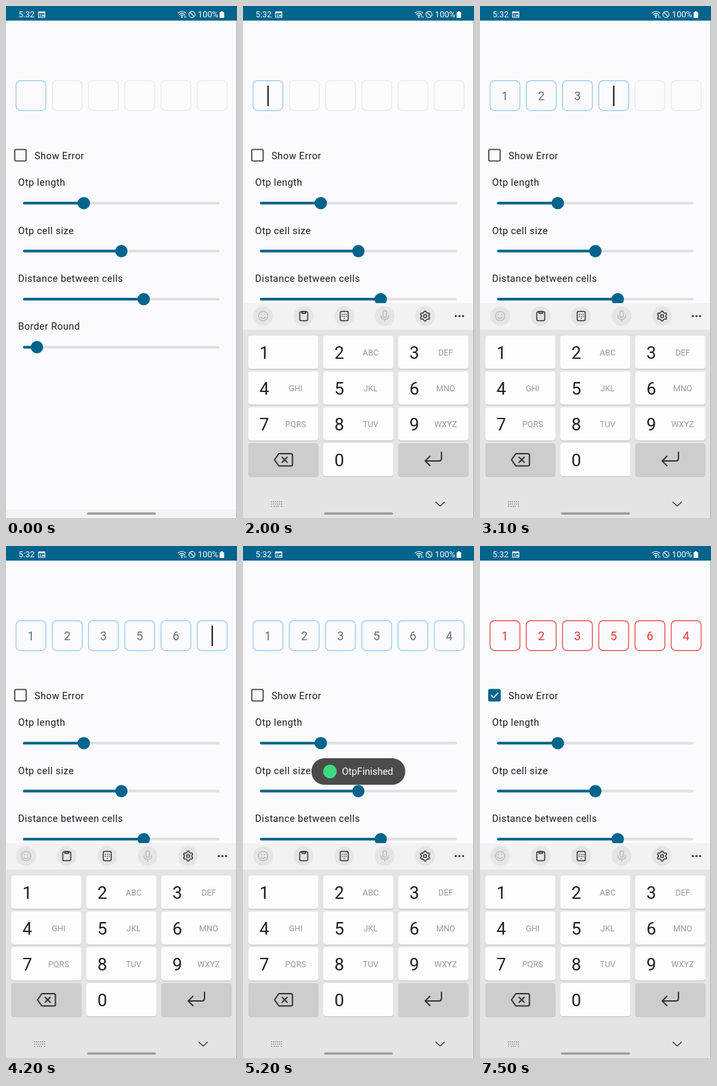
Write an HTML page that moves like this. It is 348x772 px and loops after 8 s.

```html
<!DOCTYPE html>
<html lang="en">
<head>
<meta charset="utf-8">
<style>
  html, body { margin: 0; width: 100%; height: 100%; overflow: hidden; background: #fbfbff; }
  svg { display: block; width: 100%; height: 100%; font-family: Roboto, sans-serif; }
  .label { font-size: 14.5px; letter-spacing: .45px; fill: #1b1c1f; }
  .num { font-size: 26px; fill: #1e1e1e; }
  .abc { font-size: 12.5px; fill: #999; text-anchor: middle; }
  .digit { font-size: 18px; text-anchor: middle; }
  .icon { fill: none; stroke: #333; stroke-width: 1.5; stroke-linecap: round; stroke-linejoin: round; }
  .dim { stroke: #bcbcbc; }
</style>
</head>
<body>
<svg viewBox="0 0 348 772">
  <rect width="348" height="772" fill="#fbfbff"/>
  <rect width="348" height="22" fill="#00648c"/>
  <g fill="#fff">
    <text x="19" y="17.4" font-size="12.5">5:32</text>
    <text x="289" y="17.4" font-size="12.8">100%</text>
    <path d="M323.8 8h2.8v1.2h1.1q.9 0 .9.9v7q0 .9-.9.9h-5q-.9 0-.9-.9v-7q0-.9.9-.9h1.1z"/>
    <path d="M49 8.5h9.6v2.4H49z"/>
    <circle cx="265" cy="16.6" r="1.2"/>
  </g>
  <g fill="none" stroke="#fff" stroke-width="1.1">
    <path d="M49 9h9.6v8H49zM51 13h2.2M51 15h2.2M55 13.5h2v1.5h-2z"/>
    <path d="M258.8 10.8q6.2-5 12.4 0M260.8 12.8q4.2-3.4 8.4 0M262.8 14.8q2.2-1.8 4.4 0"/>
    <path d="M269 13v5M271.2 15v3" stroke-width=".8"/>
    <circle cx="280.2" cy="12.7" r="4.6"/><path d="M277 9.5l6.4 6.4"/>
  </g>

  <g id="cells"></g>
  <rect id="cursor" y="120" width="2" height="31" fill="#111"/>

  <circle id="ripple" cx="22" cy="225" fill="#00648c"/>
  <rect id="box" x="13.2" y="216.4" width="17.2" height="17.2" rx="1.8" stroke-width="1.8"/>
  <path id="tick" d="M16.8 225l3.6 3.6 7-7.2" fill="none" stroke="#fff" stroke-width="1.8"/>
  <text class="label" x="43" y="230.7">Show Error</text>
  <g id="sliders"></g>

  <g id="toast">
    <rect x="103" y="320" width="141.5" height="40" rx="20" fill="#4b4b4b"/>
    <circle cx="131" cy="340" r="10.3" fill="#3ddc84"/>
    <text x="149" y="345.4" font-size="14.5" fill="#fff">OtpFinished</text>
  </g>

  <rect y="759" width="348" height="13" fill="#f3f3f4"/>
  <g id="keyboard">
    <rect y="448" width="348" height="324" fill="#e4e4e4"/>
    <rect y="448" width="348" height="40" fill="#f2f2f3"/>
    <g id="tools" fill="#e5e5e6"></g>
    <g class="icon dim">
      <circle cx="30.3" cy="467.5" r="7"/><path d="M26.8 469.3q3.5 4 7 0M27.8 465v.6M32.8 465v.6"/>
      <rect x="210.8" y="459.5" width="5.4" height="10" rx="2.7"/><path d="M207.8 467q0 5.5 5.7 5.5t5.7-5.5M213.5 472.5v3"/>
    </g>
    <g class="icon">
      <rect x="85.5" y="461" width="12" height="13.5" rx="2"/><path d="M88.7 460.5h5.6v3h-5.6z"/>
      <rect x="146.5" y="460.5" width="12" height="14" rx="2"/>
      <path d="M149.6 465h.1m2.8 0h.1m2.8 0h.1M149.6 468h.1m2.8 0h.1m2.8 0h.1M152.5 471h.1"/>
      <path id="gear"/><circle cx="274.3" cy="467.5" r="2.3"/>
      <path d="M320.5 467.5h.1m5.4 0h.1m5.4 0h.1" stroke-width="3.2"/>
    </g>
    <g id="keys"></g>
    <g class="icon" stroke-width="2">
      <path d="M54 675h18q2.5 0 2.5 2.5v13.5q0 2.5-2.5 2.5H54l-6.5-9.2zM59 680.5l7.5 7.5m0-7.5l-7.5 7.5" stroke-width="2"/>
      <path d="M299 673v9q0 4-4 4h-20.500m7-7l-7 7 7 7" stroke-width="2"/>
      <path d="M290.500 748l6.500 6 6.500-6" stroke-width="1.300"/>
      <path d="M43 747.500h16M43 751h16M43 754.500h1m3 0h8m3 0h1" stroke="#666" stroke-dasharray=".1 2.900"/>
    </g>
  </g>
  <rect x="122" y="763.5" width="104" height="3.6" rx="1.8" fill="#9d9d9f"/>
  <path d="M347.500 22v750" stroke="#aaa"/>
</svg>
<script>
const LOOP = 8000, BLUE = '#00648c';
const CURSOR_ON = 1400, CHECKED = 7100;
const typed = [[1, 2400], [2, 2700], [3, 3000], [5, 3800], [6, 4100], [4, 4600]];
const $ = id => document.getElementById(id);
const clamp = v => Math.min(1, Math.max(0, v));
const ramp = (t, from, to) => clamp((t - from) / (to - from));
const easeOut = v => 1 - (1 - v) ** 2;

function add(parent, tag, attrs, text = '') {
  const el = document.createElementNS('http://www.w3.org/2000/svg', tag);
  set(el, attrs);
  el.textContent = text;
  return parent.appendChild(el);
}
function set(el, attrs) {
  for (const name in attrs) el.setAttribute(name, attrs[name]);
}

const cellCentre = i => 37.6 + 54.6 * i;
const cells = typed.map(([digit], i) => ({
  frame: add($('cells'), 'rect', { x: cellCentre(i) - 22.5, y: 112.6, width: 45, height: 45, rx: 6.5, fill: 'none' }),
  digit: add($('cells'), 'text', { class: 'digit', x: cellCentre(i), y: 142.2 }, digit)
}));

[['Otp length', 117.2], ['Otp cell size', 173.8], ['Distance between cells', 207.5], ['Border Round', 46.6]]
  .forEach(([label, x], i) => {
    const g = add($('sliders'), 'g', { transform: `translate(0 ${72.4 * i})`, 'stroke-width': 4, 'stroke-linecap': 'round' });
    add(g, 'text', { class: 'label', x: 18.3, y: 271.3 }, label);
    add(g, 'path', { d: 'M27.500 297.200H320', stroke: '#dde1e6' });
    add(g, 'path', { d: `M27.500 297.200H${x}`, stroke: BLUE });
    add(g, 'circle', { cx: x, cy: 297.2, r: 9.3, fill: BLUE });
  });

for (let i = 0; i < 5; i++) add($('tools'), 'circle', { cx: 30.3 + 61 * i, cy: 467.5, r: 15 });

const teeth = Array.from({ length: 48 }, (_, i) => {
  const a = i / 48 * 2 * Math.PI, r = 6.5 + .9 * Math.tanh(3 * Math.cos(6 * a));
  return `${274.3 + r * Math.sin(a)} ${467.5 - r * Math.cos(a)}`;
});
set($('gear'), { d: `M${teeth.join('L')}Z` });

const keys = {};
const letters = ['', 'ABC', 'DEF', 'GHI', 'JKL', 'MNO', 'PQRS', 'TUV', 'WXYZ'];
['1', '2', '3', '4', '5', '6', '7', '8', '9', '', '0', ''].forEach((name, i) => {
  const x = 8 + 113 * (i % 3), y = 497 + 54 * Math.floor(i / 3);
  const size = { x, width: 105.5, height: 50, rx: 4 };
  add($('keys'), 'rect', { ...size, y: y + 1.2, fill: '#c6c6c6' });
  const key = add($('keys'), 'rect', { ...size, y, fill: name ? '#fdfdfd' : '#cdcdcd' });
  if (!name) return;
  keys[name] = key;
  add($('keys'), 'text', { class: 'num', x: x + 16.8, y: y + 35 }, name);
  add($('keys'), 'text', { class: 'abc', x: x + 71.3, y: y + 30.2 }, letters[i] || '');
});

function draw(t) {
  const count = typed.filter(([, at]) => t >= at).length;
  const error = t >= CHECKED;

  cells.forEach(({ frame, digit }, i) => {
    set(frame, { stroke: error ? '#e53935' : i <= count ? '#93c5e8' : '#e5e7ee', 'stroke-width': 1.2 });
    set(digit, { fill: error ? '#e53935' : '#6b6d77', opacity: i < count ? 1 : 0 });
  });
  set($('cursor'), { x: cellCentre(count) - .9, opacity: t >= CURSOR_ON && count < 6 ? 1 : 0 });

  for (const [digit, at] of typed) {
    set(keys[digit], { fill: t >= at - 100 && t < at + 80 ? '#d8d8d8' : '#fdfdfd' });
  }
  set($('keyboard'), { transform: `translate(0 ${324 * (1 - easeOut(ramp(t, 1800, 2000)))})` });
  set($('toast'), { opacity: ramp(t, 4700, 5000) - ramp(t, 7000, 7300) });

  set($('box'), { fill: error ? BLUE : 'none', stroke: error ? BLUE : '#46464b' });
  set($('tick'), { opacity: ramp(t, CHECKED, CHECKED + 100) });
  set($('ripple'), { r: 18 * easeOut(ramp(t, 6990, 7200)), opacity: .13 * (1 - ramp(t, 7250, 7480)) });
}

function tick() {
  draw(performance.now() % LOOP);
  requestAnimationFrame(tick);
}
tick();
</script>
</body>
</html>
```
